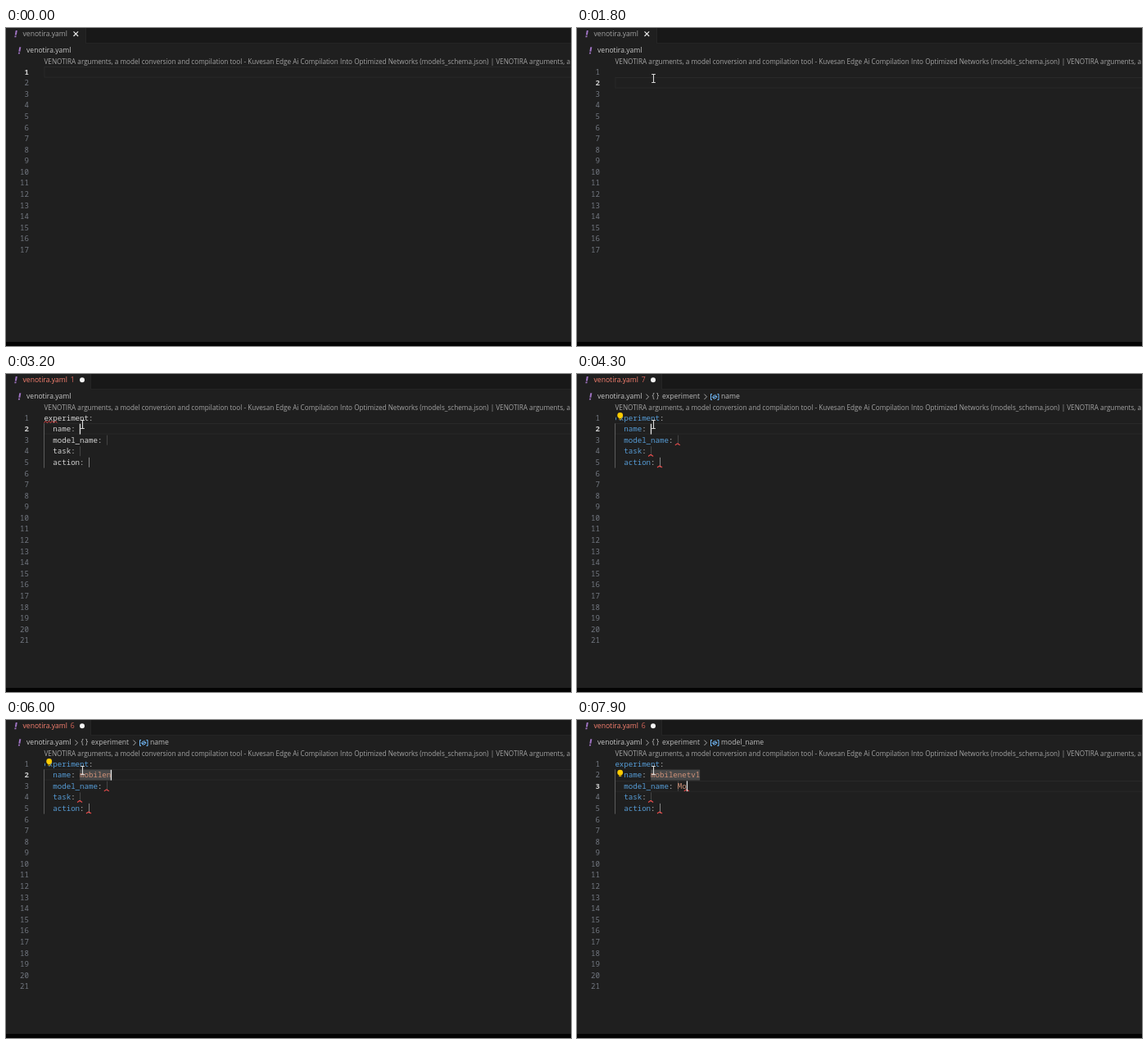
These frames come from a looping animation (690 px wide and 388 px high, 8000 ms). An HTML page with a canvas:

```html
<!DOCTYPE html>
<html lang="en">
<head>
<meta charset="utf-8">
<title>YAML editor</title>
<style>
html, body { margin: 0; width: 100%; height: 100%; overflow: hidden; background: #1f1f1f; }
canvas { display: block; width: 690px; height: 388px; }
</style>
</head>
<body>
<canvas id="stage" width="690" height="388"></canvas>
<script>
const ctx = document.getElementById('stage').getContext('2d');
const LOOP = 8000;
const CHAR = 5.46, LEFT = 46.4, ROW = 13.585;
const UI = '8.6px "Open Sans", "Noto Sans", sans-serif';
const LENS = '8.18px "Open Sans", "Noto Sans", sans-serif';
const MONO = '9.1px "Noto Sans Mono", monospace';
const KEY = '#569cd6', PLAIN = '#d4d4d4', STRING = '#ce9178', ERROR = '#f14c4c';
const FILE = 'venotira.yaml';
const LENS_TEXT = 'VENOTIRA arguments, a model conversion and compilation tool - ' +
  'Kuvesan Edge Ai Compilation Into Optimized Networks (models_schema.json) | VENOTIRA arguments, a';

const rowY = row => 53.5 + (row - 1) * ROW;
const colX = col => LEFT + col * CHAR;

// Latest value of a [time, value] schedule
function at(t, schedule) {
  let value;
  for (const [start, v] of schedule) if (t >= start) value = v;
  return value;
}

function text(str, x, y, color, font, align = 'left') {
  ctx.font = font;
  ctx.textAlign = align;
  ctx.fillStyle = color;
  ctx.fillText(str, x, y);
}

function code(str, col, row, color) {
  text(str, colX(col), rowY(row) + 3.1, color, MONO);
}

function rect(x, y, w, h, color) {
  ctx.fillStyle = color;
  ctx.fillRect(x, y, w, h);
}

function line(points, color, width = 1) {
  ctx.beginPath();
  points.forEach(([x, y]) => ctx.lineTo(x, y));
  ctx.strokeStyle = color;
  ctx.lineWidth = width;
  ctx.stroke();
}

function disc(x, y, r, color) {
  ctx.beginPath();
  ctx.arc(x, y, r, 0, Math.PI * 2);
  ctx.fillStyle = color;
  ctx.fill();
}

function squiggle(x, row, width) {
  const y = rowY(row) + 5, points = [];
  for (let i = 0; i * 2 <= width; i++) points.push([x + i * 2, y + (i % 2 ? -0.9 : 0.9)]);
  line(points, ERROR, 1);
}

function errorTick(x, row) {
  const y = rowY(row) + 6.2;
  line([[x - 3, y], [x - 0.5, y - 1.8], [x + 0.5, y - 1.8], [x + 3, y]], ERROR, 1.1);
}

function caret(col, row) {
  rect(Math.round(colX(col)) - 0.2, rowY(row) - 6.3, 1.3, 12.8, '#e4e4e4');
}

function yamlIcon(x, y) {
  ctx.save();
  ctx.translate(x, y);
  ctx.transform(1, 0, -0.18, 1, 0, 0);
  rect(-0.9, -4, 2, 5.4, '#a074c4');
  rect(-0.9, 2.5, 2, 1.8, '#a074c4');
  ctx.restore();
}

function bulb(row) {
  const y = rowY(row);
  disc(52.7, y - 3, 3.4, '#ffcc00');
  rect(51.2, y - 0.4, 3, 2.4, '#ffcc00');
  rect(51.2, y + 0.6, 3, 0.6, '#1f1f1f');
}

function pointer(x, y) {
  line([[x, y - 5], [x, y + 5]], '#d8d8d8', 1.1);
  for (const dy of [-5, 5]) line([[x - 2.3, y + dy], [x + 2.3, y + dy]], '#d8d8d8', 1);
}

function wrench(x, y) {
  line([[x - 4, y + 4], [x + 1, y - 1]], '#e8e8e8', 2.4);
  line([[x - 3.6, y + 3.6], [x + 1, y - 1]], '#04395e', 0.8);
  ctx.beginPath();
  ctx.arc(x + 2, y - 2, 2.4, -0.3, Math.PI * 1.6);
  ctx.strokeStyle = '#e8e8e8';
  ctx.lineWidth = 1.2;
  ctx.stroke();
}

function popup(col, row, label, matched, isProperty) {
  const x = Math.round(colX(col)), y = rowY(row) + 6.5, bold = 'bold ' + MONO;
  rect(x, y, 309, 16, '#04395e');
  ctx.strokeStyle = '#3c4a56';
  ctx.lineWidth = 1;
  ctx.strokeRect(x + 0.5, y + 0.5, 308, 15);
  if (isProperty) wrench(x + 8, y + 8);
  else text('abc', x + 2, y + 10.5, '#e8e8e8', 'bold 6.3px "Open Sans", sans-serif');
  text(label.slice(0, matched), x + 16.6, y + 11, '#2aaaff', bold);
  text(label.slice(matched), x + 16.6 + matched * CHAR, y + 11, '#ffffff', bold);
}

function chevron(x) {
  line([[x - 1.6, 24.6], [x + 1.5, 27.8], [x - 1.6, 31]], '#a8a8a8', 1);
}

function drawTab(t) {
  const errors = at(t, [[0, ''], [2700, '1'], [3700, '7'], [5100, '6']]);
  const dirty = t >= 2300, right = errors ? 103 : 97, markX = errors ? 93 : 85.3;
  rect(0, 0, 690, 18, '#181818');
  rect(0, 18, 690, 1, '#242424');
  rect(0, 0, right, 19, '#1f1f1f');
  rect(right, 0, 1, 18, '#252525');
  yamlIcon(12, 7);
  text(FILE, 20.5, 10.1, errors ? '#f88070' : '#a2a2a2', UI);
  if (errors) text(errors, 78.7, 10.1, '#d8655a', UI);
  if (dirty) return disc(markX, 7.2, 3, '#f4f4f4');
  line([[82.5, 4.4], [88.1, 10]], '#e8e8e8', 1.2);
  line([[88.1, 4.4], [82.5, 10]], '#e8e8e8', 1.2);
}

function drawBreadcrumbs(t) {
  yamlIcon(16.5, 27.3);
  text(FILE, 25, 30.4, '#c8c8c8', UI);
  if (t < 3500) return;
  chevron(86);
  text('{ }', 91.5, 30.3, '#c4c4c4', UI);
  text('experiment', 104, 30.4, '#bcbcbc', UI);
  chevron(157);
  line([[165, 24.5], [163.5, 24.5], [163.5, 31.5], [165, 31.5]], '#75beff');
  line([[171.5, 24.5], [173, 24.5], [173, 31.5], [171.5, 31.5]], '#75beff');
  ctx.beginPath();
  ctx.ellipse(168.2, 28, 2.5, 2, -0.4, 0, Math.PI * 2);
  ctx.stroke();
  line([[166.2, 28.8], [170, 27.2]], '#75beff');
  text(t < 7000 ? 'name' : 'model_name', 176, 30.4, '#bcbcbc', UI);
}

function drawGutter(t, active) {
  const count = t < 3200 ? 17 : 21;
  const y = Math.round(rowY(active) - 6.8);
  rect(LEFT, y, 644, 13.6, '#292929');
  rect(LEFT + 1, y + 1, 643, 11.6, '#1f1f1f');
  for (let row = 1; row <= count; row++) {
    const on = row === active;
    text(row, 28, rowY(row) + 3.1, on ? '#d0d0d0' : '#727780', (on ? 'bold ' : '') + MONO, 'right');
  }
}

function drawFirstWord(t) {
  const word = at(t, [[0, ''], [2300, 'e'], [2600, 'ex'], [2700, 'exp']]);
  code(word, 0, 1, STRING);
  if (t >= 2700) squiggle(LEFT, 1, t < 3000 ? 6 : 16);
  const blinkOn = t >= 2200 || (t >= 1300 && t < 1800);
  if (blinkOn) caret(word.length, t < 2200 ? 2 : 1);
  if (t >= 2400) popup(word.length, 1, 'experiment', word.length, true);
}

function drawSnippet(t) {
  const keyColor = t < 3500 ? PLAIN : KEY;
  const keys = ['name', 'model_name', 'task', 'action'];
  const typed = at(t, [[0, 0], [4700, 1], [4800, 2], [5000, 3], [5200, 4], [5400, 5], [5700, 6],
    [6000, 7], [6100, 8], [6200, 9], [6500, 10], [6700, 11]]);
  const name = 'mobilenetv1'.slice(0, typed);
  const model = at(t, [[0, ''], [7700, 'M'], [7900, 'Mo']]);

  rect(46, rowY(2) - 6.8, 1, ROW * 4, '#5c5c5c');
  rect(colX(8), rowY(2) - 6.5, typed * CHAR, 13, '#484848');
  code('experiment', 0, 1, keyColor);
  code(':', 10, 1, PLAIN);
  keys.forEach((key, i) => {
    const row = i + 2, end = key.length + 4;
    code(key, 2, row, keyColor);
    code(':', 2 + key.length, row, PLAIN);
    if (i) rect(Math.round(colX(end)), rowY(row) - 6, 1, 12, i === 3 ? '#858585' : '#444444');
    if (i && t >= 3800) errorTick(colX(end + (i === 1 ? model.length : 0)), row);
  });
  if (t < 3500) squiggle(LEFT, 1, 16);
  code(name, 8, 2, STRING);
  code(model, 14, 3, STRING);

  if (t >= 3800 && t < 7400) {
    rect(48, rowY(1) - 6, 3.4, 11, '#1f1f1f');
    bulb(1);
  }
  if (t >= 7500) bulb(2);

  const hidden = (t >= 3800 && t < 4300) || (t >= 7500 && t < 7700);
  if (!hidden) {
    if (t < 7000) caret(8 + typed, 2);
    else caret(14 + model.length, 3);
  }
  if (t >= 4700 && t < 5000) popup(8 + typed, 2, 'model_name:', typed, false);
}

function drawPointer(t) {
  if (t < 500) return;
  const path = [[600, 213], [440, 180], [325, 147], [242, 122], [186, 87], [130, 67], [93.5, 61.5]];
  pointer(...path[Math.min(path.length - 1, Math.floor((t - 500) / 100))]);
}

function draw(t) {
  rect(0, 0, 690, 388, '#1f1f1f');
  drawTab(t);
  drawBreadcrumbs(t);
  drawGutter(t, at(t, [[0, 1], [1300, 2], [2200, 1], [3200, 2], [7000, 3]]));
  text(LENS_TEXT, 46.5, 44.4, '#a3a3a3', LENS);
  if (t < 3200) drawFirstWord(t);
  else drawSnippet(t);
  drawPointer(t);
  rect(0, 383, 690, 5, '#040404');
}

function tick() {
  draw(performance.now() % LOOP);
  requestAnimationFrame(tick);
}
tick();
</script>
</body>
</html>
```
